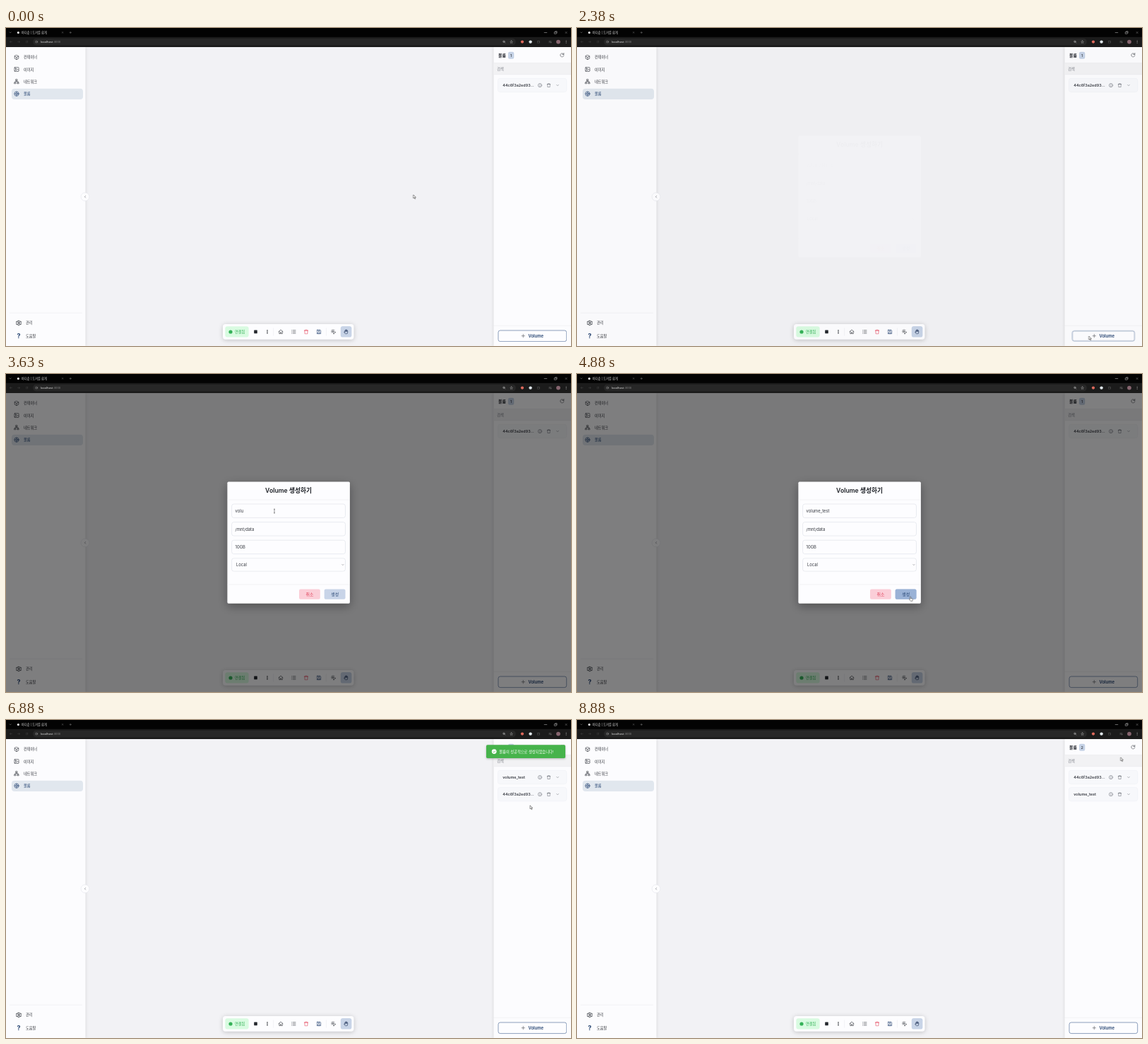
An HTML page for the animation above (9.01 s loop, 800 by 450 pixels).

```html
<!DOCTYPE html>
<html lang="ko">
<head>
<meta charset="utf-8">
<title>Volume 생성하기</title>
<style>
  html, body { margin: 0; width: 100%; height: 100%; overflow: hidden; background: #f2f2f5; }
  svg { display: block; }
  #stage { --t: 0ms; width: 100vw; height: 100vh; font: 5.2px Inter, "Noto Sans CJK KR", sans-serif; }
  text { fill: #33363d; }
  .mid { text-anchor: middle; }
  .navy { fill: #22406f; font-weight: 500; }
  .name { font-size: 5.42px; font-weight: 600; fill: #3a3d44; }
  .field text { font-size: 5.83px; }
  .field rect { fill: #fdfdff; stroke: #dcdfe6; stroke-width: .6; }
  .icon { fill: none; stroke: #30343b; stroke-width: 2; stroke-linecap: round; stroke-linejoin: round; }
  .chrome { stroke: #c9c9c9; }
  .dim { stroke: #555; }
  .card rect { fill: #f7f8fb; stroke: #eceef2; stroke-width: .5; }
  .card .icon { stroke: #5b5f67; }
  .rule { stroke: #e6e7eb; stroke-width: .5; }
  .panel { fill: #fcfcfe; filter: drop-shadow(0 0 2px #0002); }
  .bar { fill: #fdfdff; filter: drop-shadow(0 1px 3px #0003); }
  .dialog { fill: #fdfdff; filter: drop-shadow(0 4px 7px #0005); }

  /* Every animation is paused; the clock scrubs it through --t. */
  .span, .press, #modal, #toast, #cursor, .down, .up { animation-play-state: paused !important; }
  .span {
    animation: on 1ms backwards, off 1ms forwards;
    animation-delay: calc(var(--from, 0ms) - var(--t) - 1ms), calc(var(--to, 9999ms) - var(--t) - 1ms);
  }
  .press {
    transform-box: fill-box; transform-origin: center;
    animation: press 250ms linear; animation-delay: calc(2250ms - var(--t));
  }
  #modal {
    animation: fade 225ms cubic-bezier(.4, 0, .2, 1) backwards, off 1ms forwards;
    animation-delay: calc(2355ms - var(--t)), calc(5124ms - var(--t));
  }
  #toast {
    animation: enter 225ms cubic-bezier(0, 0, .2, 1) backwards, leave 195ms cubic-bezier(.4, 0, .6, 1) forwards;
    animation-delay: calc(6300ms - var(--t)), calc(7920ms - var(--t));
  }
  .down { animation: down 2s; animation-delay: calc(6375ms - var(--t)); }
  .up {
    animation: up 2s, on 1ms backwards;
    animation-delay: calc(6375ms - var(--t)), calc(6374ms - var(--t));
  }
  #cursor { animation: roam 9010ms ease-in-out both; animation-delay: calc(0ms - var(--t)); }

  @keyframes on { from { visibility: hidden; } }
  @keyframes off { to { visibility: hidden; } }
  @keyframes press { from, to { transform: scale(.91); } }
  @keyframes fade { from { opacity: 0; } }
  @keyframes enter { from { transform: translateX(124px); } }
  @keyframes leave { to { transform: translateX(124px); } }
  @keyframes down { from, to { transform: translateY(24px); } }
  @keyframes up { from, to { transform: translateY(-24px); } }
  @keyframes roam {
    0%, 12.5% { transform: translate(576.7px, 236px); }
    22%, 27.8% { transform: translate(724.7px, 436px); }
    33.3%, 47.5% { transform: translate(380px, 194px); }
    52.5%, 56.8% { transform: translate(471.5px, 315px); }
    56.9%, 60% { transform: translate(469.8px, 315px); animation-timing-function: ease-in; }
    69.4% { transform: translate(640px, 190px); animation-timing-function: ease-out; }
    75.5%, 82% { transform: translate(742px, 120.8px); }
    96%, 100% { transform: translate(769.7px, 52.8px); }
  }
</style>
</head>
<body>
<svg id="stage" viewBox="0 0 800 450">
  <defs>
    <symbol id="box" viewBox="0 0 24 24"><path d="M12 2l9 5v10l-9 5-9-5V7zM3 7l9 5 9-5M12 12v10"/></symbol>
    <symbol id="image" viewBox="0 0 24 24"><rect x="2" y="3" width="20" height="18" rx="2"/><circle cx="8" cy="9" r="2"/><path d="M3 19l6-5 3 2 5-5 5 5"/></symbol>
    <symbol id="network" viewBox="0 0 24 24"><rect x="9" y="2" width="6" height="6"/><rect x="2" y="16" width="6" height="6"/><rect x="16" y="16" width="6" height="6"/><path d="M12 8v4M5 16v-4h14v4"/></symbol>
    <symbol id="gear" viewBox="0 0 24 24"><path d="M10 2h4l1 3 3 1 3-1 2 4-2 3 2 3-2 4-3-1-3 1-1 3h-4l-1-3-3-1-3 1-2-4 2-3-2-3 2-4 3 1 3-1z"/><circle cx="12" cy="12" r="3.5"/></symbol>
    <symbol id="disk" viewBox="0 0 24 24"><circle cx="12" cy="12" r="10"/><circle cx="12" cy="12" r="4"/><path d="M12 2v6M12 16v6M2 12h6M16 12h6"/></symbol>
    <symbol id="info" viewBox="0 0 24 24"><circle cx="12" cy="12" r="10"/><path d="M12 11v6M12 7v.1"/></symbol>
    <symbol id="trash" viewBox="0 0 24 24"><path d="M3 6h18M8 6V3h8v3M5 6l1 16h12l1-16"/></symbol>
    <symbol id="chevron" viewBox="0 0 24 24"><path d="M6 9l6 6 6-6"/></symbol>
    <symbol id="left" viewBox="0 0 24 24"><path d="M15 6l-6 6 6 6"/></symbol>
    <symbol id="arrow" viewBox="0 0 24 24"><path d="M21 12H3M11 4l-8 8 8 8"/></symbol>
    <symbol id="reload" viewBox="0 0 24 24"><path d="M20 8a9 9 0 1 0 1 6M21 2v7h-7"/></symbol>
    <symbol id="home" viewBox="0 0 24 24"><path d="M2 12L12 3l10 9M5 10v11h5v-6h4v6h5V10"/></symbol>
    <symbol id="list" viewBox="0 0 24 24"><path d="M8 5h13M8 12h13M8 19h13M3 5h.1M3 12h.1M3 19h.1"/></symbol>
    <symbol id="save" viewBox="0 0 24 24"><path d="M3 3h14l4 4v14H3zM7 3v5h9V3M8 13h8v8H8z"/></symbol>
    <symbol id="spark" viewBox="0 0 24 24"><path d="M10 10l12 4-5 3-3 5zM10 2v4M2 10h4M4 4l3 3M16 4l-3 3M4 16l3-3"/></symbol>
    <symbol id="hand" viewBox="0 0 24 24"><path d="M7 13V6q1.500-2 3 0V4q1.500-2 3 0v1q1.500-2 3 0v3q1.500-2 3 0v7q0 7-7 7-4 0-6-4l-3-5q1-2 4 0M10 6v5M13 5v6M16 6v5"/></symbol>
    <symbol id="plus" viewBox="0 0 24 24"><path d="M12 3v18M3 12h18"/></symbol>
    <symbol id="close" viewBox="0 0 24 24"><path d="M4 4l16 16M20 4L4 20"/></symbol>
    <symbol id="star" viewBox="0 0 24 24"><path d="M12 2l3 7 7 1-5 5 1 7-6-4-6 4 1-7-5-5 7-1z"/></symbol>
    <symbol id="zoom" viewBox="0 0 24 24"><circle cx="10" cy="10" r="7"/><path d="M15 15l7 7M7 10h6M10 7v6"/></symbol>
    <symbol id="puzzle" viewBox="0 0 24 24"><path d="M3 6h6q0-4 3-4t3 4h5v15H3z"/></symbol>
    <symbol id="media" viewBox="0 0 24 24"><path d="M3 5h12M3 11h9M3 17h6M20 5v12"/><circle cx="17" cy="17" r="3"/></symbol>
    <g id="card" class="card">
      <rect x="696.500" y="71.300" width="97.300" height="19.300" rx="3"/>
      <g class="icon">
        <use href="#info" x="752.900" y="78" width="6.200" height="6.200"/>
        <use href="#trash" x="765.400" y="78" width="6.200" height="6.200"/>
        <use href="#chevron" x="778.300" y="78.300" width="5.500" height="5.500"/>
      </g>
    </g>
  </defs>

  <!-- page -->
  <rect width="800" height="450" fill="#f2f2f5"/>
  <rect class="panel" y="27" width="112.500" height="423"/>
  <rect class="panel" x="690.500" y="27" width="110" height="423"/>

  <!-- sidebar -->
  <rect x="8" y="85.700" width="101" height="15.200" rx="4" fill="#e1e7ee"/>
  <g class="icon">
    <use href="#box" x="11.200" y="37.700" width="7.600" height="7.600"/>
    <use href="#image" x="11.200" y="54.800" width="7.600" height="7.600"/>
    <use href="#network" x="11.200" y="72" width="7.600" height="7.600"/>
    <use href="#disk" x="11.200" y="89.300" width="7.600" height="7.600" stroke="#22406f"/>
    <use href="#gear" x="14" y="413.400" width="8" height="8" stroke-width="2.500"/>
  </g>
  <text x="25" y="43.400">컨테이너</text>
  <text x="25" y="60.600">이미지</text>
  <text x="25" y="77.800">네트워크</text>
  <text x="25" y="95.100" class="navy">볼륨</text>
  <path class="rule" d="M5 403.200h103"/>
  <text x="28" y="419.400">관리</text>
  <text x="28" y="438.100">도움말</text>
  <text x="18" y="439.300" class="mid" style="font-size:9px;font-weight:700;fill:#22406f">?</text>
  <circle cx="112" cy="238.800" r="5.900" fill="#fdfdff" stroke="#dfe1e6" stroke-width=".5"/>
  <use href="#left" class="icon" x="109.400" y="236.200" width="5.200" height="5.200" stroke-width="3"/>

  <!-- volume panel -->
  <rect x="690.500" y="49.500" width="110" height="16.300" fill="#f2f2f4"/>
  <path class="rule" d="M690.500 49.500h110M690.500 65.800h110M690.500 421.300h110"/>
  <text x="697" y="40.500" style="font-size:5.900px;font-weight:700;fill:#24272e">볼륨</text>
  <rect x="711" y="33.700" width="8.300" height="10" rx="2.200" fill="#c5d2e6"/>
  <g class="mid" font-size="5.400" font-weight="500">
    <text x="715.200" y="40.600" class="span" style="--to:6375ms">1</text>
    <text x="715.200" y="40.600" class="span" style="--from:6375ms">2</text>
  </g>
  <use href="#reload" class="icon" x="784" y="34.900" width="6.800" height="6.800"/>
  <text x="695.200" y="59.500" style="fill:#777b83">검색</text>
  <use href="#card"/>
  <use href="#card" y="24.100" class="span" style="--from:6375ms"/>
  <text class="name down" x="703.300" y="83.200">44c6f3a2ed93...</text>
  <text class="name up" x="703.300" y="107.200">volume_test</text>
  <rect class="press" x="697" y="428" width="96.700" height="15.600" rx="2.800" fill="#fdfdff" stroke="#42618f" stroke-width=".6"/>
  <use href="#plus" class="icon" x="729.300" y="432.700" width="6" height="6" stroke="#22406f" stroke-width="3"/>
  <text x="739.500" y="437.900" class="navy" style="font-size:5.900px;font-weight:600">Volume</text>

  <!-- toolbar -->
  <rect class="bar" x="307" y="419" width="185.500" height="21.800" rx="4"/>
  <rect x="310.300" y="422.200" width="33.300" height="15.300" rx="3" fill="#d9fbe1"/>
  <circle cx="318" cy="430" r="2.600" fill="#35b258"/>
  <text x="324" y="431.900" style="fill:#35b258">연결됨</text>
  <rect x="351.200" y="427.600" width="4.600" height="4.600" rx=".4" fill="#25282e"/>
  <path d="M370 427.300v5.200" stroke="#25282e" stroke-width="1.200" stroke-dasharray="1.400 .5"/>
  <path class="rule" d="M378.700 424.500v11M453.400 424.500v11"/>
  <rect x="473.800" y="422" width="15.600" height="15.600" rx="3.200" fill="#c8d4e7"/>
  <g class="icon" stroke-width="2.200">
    <use href="#home" x="385.300" y="426.100" width="7.500" height="7.500"/>
    <use href="#list" x="403.700" y="426.300" width="7.200" height="7.200"/>
    <use href="#trash" x="421.400" y="426.300" width="7.200" height="7.200" stroke="#e33d55"/>
    <use href="#save" x="439.500" y="426.300" width="7.200" height="7.200" stroke="#22406f"/>
    <use href="#spark" x="459.900" y="426.100" width="7.500" height="7.500"/>
    <use href="#hand" x="477.700" y="426" width="7.600" height="7.600" stroke="#1c2f55"/>
  </g>

  <!-- dialog -->
  <g id="modal">
    <rect y="27" width="800" height="423" fill="#000" opacity=".5"/>
    <rect class="dialog" x="313.400" y="152.500" width="173.500" height="172.300" rx="1.700"/>
    <path class="rule" d="M313.400 178h173.500M313.400 298h173.500"/>
    <text x="400" y="168.300" class="mid" style="font-size:8.700px;font-weight:600;fill:#1d2026">Volume 생성하기</text>
    <g class="field">
      <rect x="319.600" y="184" width="160.900" height="19.400" rx="3"/>
      <rect x="319.600" y="209.600" width="160.900" height="19.400" rx="3"/>
      <rect x="319.600" y="235.200" width="160.900" height="19.400" rx="3"/>
      <rect x="319.600" y="260.800" width="160.900" height="18.300" rx="3"/>
      <text x="324.600" y="195.900" class="span" style="--to:3375ms;fill:#a0a4ab">Volume Name</text>
      <text x="324.600" y="195.900" id="typed"></text>
      <text x="324.600" y="221.500">/mnt/data</text>
      <text x="324.600" y="247.100">10GB</text>
      <text x="326" y="272.100">Local</text>
      <use href="#chevron" class="icon" x="474.600" y="267.700" width="4.600" height="4.600" stroke-width="4"/>
    </g>
    <rect x="415" y="304.500" width="29.800" height="14.300" rx="2" fill="#fbced8"/>
    <rect x="450.700" y="304.500" width="29.800" height="14.300" rx="2" fill="#c8d4e8"/>
    <rect x="450.700" y="304.500" width="29.800" height="14.300" rx="2" fill="#9ab2d6" class="span" style="--from:4625ms"/>
    <g class="mid" font-size="5.900">
      <text x="430" y="313.800" style="fill:#df3f58">취소</text>
      <text x="465.700" y="313.800" class="navy">생성</text>
    </g>
  </g>

  <g id="toast">
    <rect x="680" y="35.200" width="112" height="18.800" rx="1.700" fill="#46b34b" style="filter:drop-shadow(0 1px 1.500px #0004)"/>
    <circle cx="691.200" cy="44.600" r="3.400" fill="#fff"/>
    <path d="M689.500 44.700l1.200 1.200 2.200-2.400" fill="none" stroke="#46b34b" stroke-width=".8"/>
    <text x="698.200" y="46.600" style="font-size:5.270px;fill:#fff">볼륨이 성공적으로 생성되었습니다!</text>
  </g>

  <!-- browser -->
  <rect width="800" height="13" fill="#030303"/>
  <rect y="12.800" width="800" height="14.200" fill="#1b1b1b"/>
  <rect x="38" y="14.800" width="684" height="9.600" rx="4.800" fill="#272727"/>
  <circle cx="17.400" cy="6.400" r="1.500" fill="#fff"/>
  <text x="22" y="8" style="font-size:4.200px;fill:#d8d8d8">바다솥 | 도커를 쉽게</text>
  <text x="49" y="21.200" style="font:4.200px 'Open Sans',sans-serif;fill:#eee">localhost<tspan fill="#8a8a8a">:3000</tspan></text>
  <g class="icon chrome">
    <use href="#chevron" x="4" y="4.200" width="4.400" height="4.400"/>
    <use href="#close" x="78.600" y="4.900" width="3" height="3"/>
    <use href="#plus" x="89.400" y="4.600" width="3.600" height="3.600"/>
    <use href="#info" x="41.100" y="17.600" width="4" height="4"/>
    <use href="#reload" x="27.500" y="17.600" width="4" height="4" class="dim"/>
    <use href="#arrow" x="5" y="17.600" width="4" height="4" class="dim"/>
    <use href="#arrow" transform="translate(20 17.600) scale(-1 1)" width="4" height="4" class="dim"/>
    <use href="#zoom" x="703" y="17.300" width="4.600" height="4.600"/>
    <use href="#star" x="713.300" y="17.300" width="4.600" height="4.600"/>
    <use href="#puzzle" x="752" y="17.500" width="4.200" height="4.200" stroke="#888"/>
    <use href="#media" x="768.300" y="17.500" width="4.400" height="4.400" stroke="#888"/>
    <use href="#close" x="791.300" y="4.700" width="3.600" height="3.600"/>
    <path d="M762.200 6.500h3.600M776.700 5.700h2.500v2.500h-2.500zM777.700 5v-.3h2.400v2.400" stroke-width=".5"/>
    <path d="M793.200 18v.01M793.200 19.600v.01M793.200 21.200v.01" stroke-width=".8"/>
  </g>
  <circle cx="731" cy="19.600" r="2.100" fill="#df6a5c"/>
  <circle cx="742.600" cy="19.600" r="2.200" fill="#dfe6ea"/>
  <circle cx="782" cy="19.600" r="2.900" fill="#86656f"/>

  <g id="cursor" fill="#fff" stroke="#222" stroke-width=".5" stroke-linejoin="round">
    <g class="span" style="--to:3000ms"><path id="pointer" d="M0 0v5l1.200-1.100.9 2 .9-.4-.9-1.900h1.600z"/></g>
    <path class="span" style="--from:3000ms;--to:4375ms" d="M-1 -2.800h2M0 -2.800v5.600M-1 2.800h2" fill="none"/>
    <path class="span" style="--from:4375ms;--to:5125ms" d="M0 .3q.6-.7 1.100 0v2.200l2.200.5q.6.300.5 1l-.4 2.300h-2.600l-1.900-2.300q.2-.9 1.100-.1z"/>
    <g class="span" style="--from:5125ms"><use href="#pointer"/></g>
  </g>
</svg>
<script>
  const LOOP = 9010, TICK = 125, WORD = 'volume_test';
  const stage = document.getElementById('stage');
  const typed = document.getElementById('typed');
  const start = performance.now();

  function draw(now) {
    const elapsed = Math.max(0, now - start) % LOOP;
    const t = Math.floor(elapsed / TICK) * TICK;
    stage.style.setProperty('--t', t + 'ms');
    typed.textContent = WORD.slice(0, Math.max(0, Math.ceil((t - 3300) / 88)));
    requestAnimationFrame(draw);
  }
  draw(start);
</script>
</body>
</html>
```
